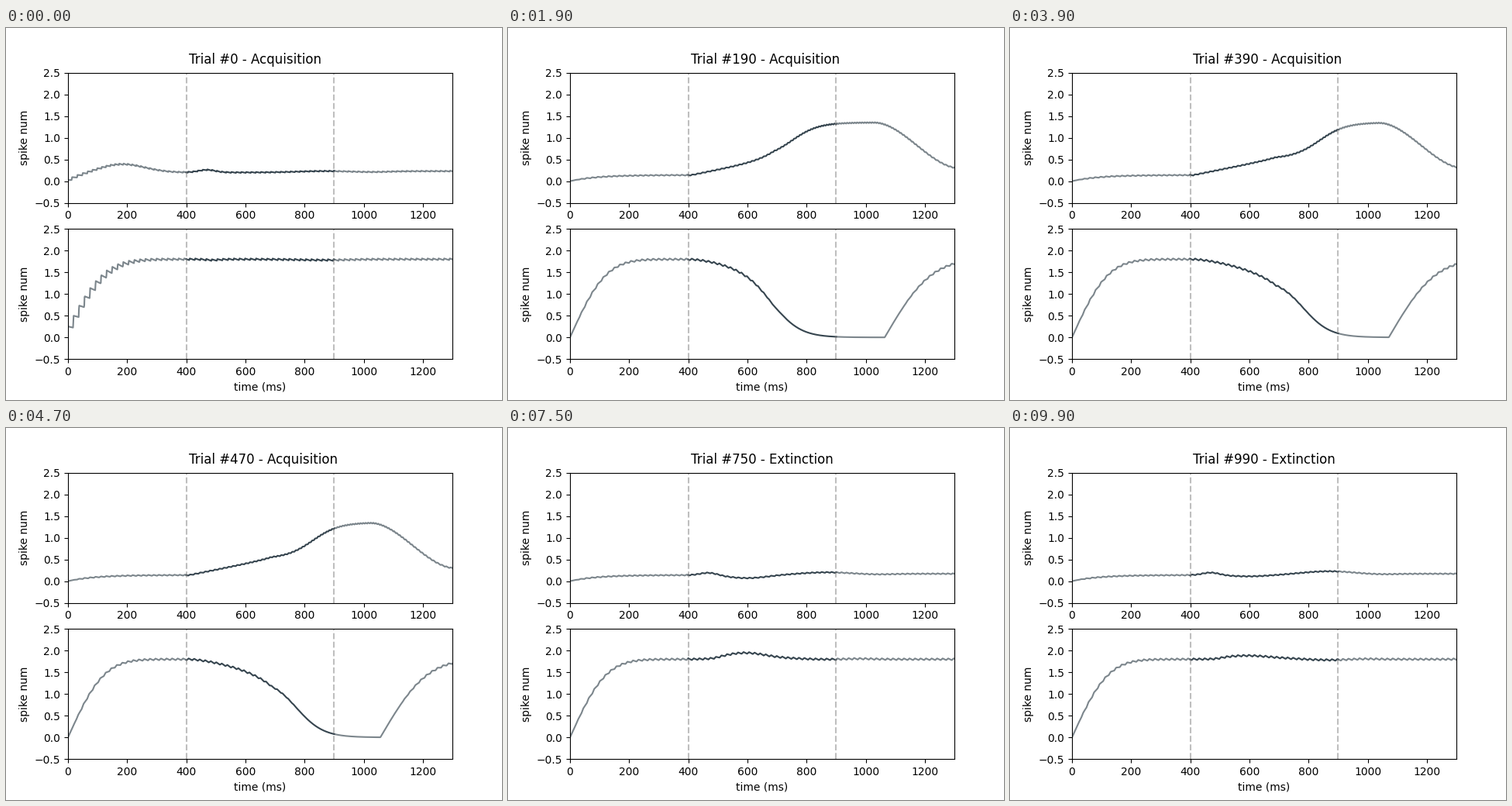
A matplotlib script that plays this animation: 640 px wide and 480 px high, repeating every 10 s.

```python
import math

import matplotlib.pyplot as plt
import numpy as np
from matplotlib.animation import FuncAnimation

FRAMES, INTERVAL = 100, 100
TRIALS_PER_FRAME = 10
EXTINCTION_START = 500
ONSET, OFFSET, END = 400, 900, 1300
FULL_RATE = 1.8
INK = "#36454f"

t = np.arange(0, END + 1.0)
erf = np.vectorize(math.erf)


def smoothstep(x):
    x = np.clip(x, 0, 1)
    return x * x * (3 - 2 * x)


def sigmoid(center, width=45):
    return 1 / (1 + np.exp(-(t - center) / width))


def hump(center, width):
    return np.exp(-(((t - center) / width) ** 2))


def charge(start, width):
    return FULL_RATE * erf(np.maximum(t - start, 0) / width)


def ripple(period, phase, rise):
    """Unit sawtooth: slow decay between spikes, quick rise at each spike."""
    cycles = np.cumsum(np.ones_like(t) / period) - 1 / np.mean(period) + phase
    return np.interp(cycles % 1, [0, 1 - rise, 1], [0.5, -0.5, 0.5])


def learned(trial):
    gain = smoothstep((trial - 10) / 180)
    loss = smoothstep((trial - EXTINCTION_START) / 130)
    return gain * (1 - loss)


def conditioned(trial, jitter):
    """Extra output and remaining inhibition once the response is learned."""
    center = np.interp(trial, [190, 310, 470], [752, 850, 822]) + jitter
    release = np.interp(trial, [190, 310, 470], [1030, 1055, 1015]) + jitter
    ramp = np.clip((t - 410) / 280, 0, 1)
    fall = 1 - 0.87 * smoothstep((t - release) / 290)
    up = (0.38 * ramp + 0.83 * sigmoid(center)) * fall
    low = (FULL_RATE - 0.45 * ramp ** 1.5) * (1 - sigmoid(center - 54))
    return up, np.where(t < release, low, low + charge(release + 36, 175))


def unconditioned(trial, jitter):
    """Small deviations from rest while the stimulus is on."""
    stages = [0, 630, 870, 990]
    late = np.interp(trial, stages, [0.03, 0.19, -0.04, 0.07]) + jitter / 400
    dip = np.interp(trial, stages, [0, 0.03, 0.11, 0.03])
    up = (0.06 * hump(470, 40) - dip * hump(600, 90) + late * hump(870, 130)
          + 0.03 * sigmoid(1080, 30))
    return up, FULL_RATE + dip * hump(590, 90)


def responses(trial):
    rng = np.random.default_rng(trial)
    jitter = rng.normal(0, 4)
    fresh = trial == 0
    skill = learned(trial)
    up_on, low_on = conditioned(trial, jitter)
    up_off, low_off = unconditioned(trial, jitter)

    base = 0.14 + 0.06 * fresh
    up = base * (1 - np.exp(-t / (90 - 30 * fresh))) + fresh * 0.2 * hump(180, 110)
    up += skill * up_on + (1 - skill) * up_off
    window = sigmoid(480, 15) - sigmoid(1000, 25)
    low_off = low_off - 0.6 * (up - 0.2) * window
    low = skill * low_on + (1 - skill) * low_off
    low *= charge(-9 * fresh, 135 + 15 * fresh) / FULL_RATE

    # the first trial shows single spikes, later ones a running mean
    settle = 1 if fresh else smoothstep(t / 60)
    rise = 0.07 if fresh else 0.35
    phase_up, phase_low = (0.3, 0) if fresh else rng.uniform(size=2)
    size_up = 0.022 + fresh * 0.045 * np.exp(-t / 130)
    size_low = 0.04 + fresh * 0.22 * hump(0, 170)
    firing = np.where(t < ONSET, 1, smoothstep((low - 0.4) / 1.2))
    up += settle * size_up * ripple(20 / (1 + up), phase_up, rise)
    low += settle * firing * size_low * ripple(18.7, phase_low, rise)
    return np.maximum(up, 0), np.maximum(low, 0)


fig, axes = plt.subplots(2, 1, figsize=(6.4, 4.8), dpi=100)
SPANS = [(0, ONSET, 0.65), (ONSET, OFFSET, 1), (OFFSET, END, 0.65)]
lines = []
for ax in axes:
    lines.append([ax.plot([], [], color=INK, alpha=alpha, lw=1.5)[0] for _, _, alpha in SPANS])
    for x in (ONSET, OFFSET):
        ax.axvline(x, color="gray", alpha=0.5, ls="--", lw=1.5)
    ax.set_xlim(0, END)
    ax.set_ylim(-0.5, 2.5)
    ax.set_xticks(range(0, END, 200))
    ax.set_yticks(np.arange(-0.5, 2.6, 0.5))
    ax.set_ylabel("spike num")
axes[1].set_xlabel("time (ms)")
title = axes[0].text(410, 2.7, "", fontsize=12)


def update(frame):
    trial = frame * TRIALS_PER_FRAME
    phase = "Acquisition" if trial < EXTINCTION_START else "Extinction"
    title.set_text(f"Trial #{trial} - {phase}")
    for group, y in zip(lines, responses(trial)):
        for line, (start, stop, _) in zip(group, SPANS):
            line.set_data(t[start:stop + 1], y[start:stop + 1])
    return [title, *lines[0], *lines[1]]


anim = FuncAnimation(fig, update, frames=FRAMES, interval=INTERVAL, repeat=True, repeat_delay=0)
plt.show()
```
